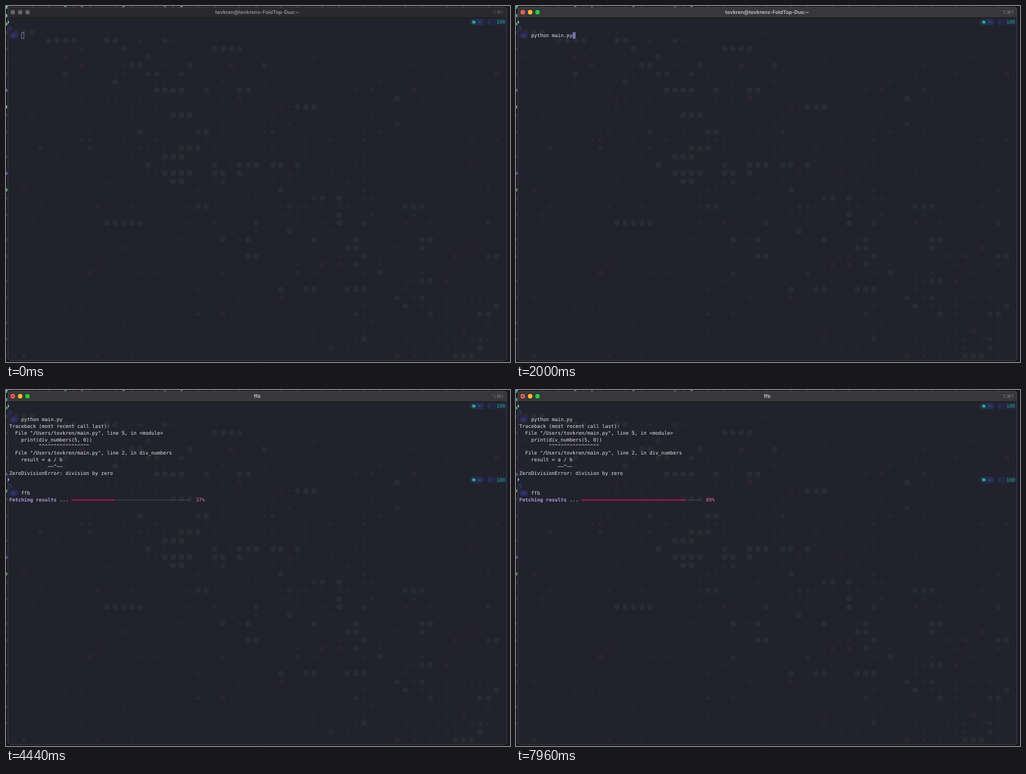
Write an HTML page with a canvas that moves like this. It is 891x629 px and loops after 8 s.

```html
<!DOCTYPE html>
<html lang="en">
<head>
<meta charset="utf-8">
<title>Terminal</title>
<style>
html, body { margin: 0; width: 100%; height: 100%; overflow: hidden; background: #18181f; }
canvas { display: block; }
</style>
</head>
<body>
<canvas id="stage" width="891" height="629"></canvas>
<script>
const ctx = document.getElementById('stage').getContext('2d');
const LOOP = 8000, COL = 5.238, ROW = 11.83, LEFT = 5.8, TOP = 28.4, PITCH = 14.66;
const USER = 'tovkren', HOME_TITLE = `${USER}@${USER}s-FoldTop-Duo:~`;
const MONO = '8.7px "DejaVu Sans Mono", monospace';
const TITLE_FONT = 'bold 8.8px Inter, sans-serif';
const KEYS_FONT = '8.4px Inter, "DejaVu Sans", sans-serif';
const WHITE = '#e6e6ea', NAVY = '#282c58', GREEN = '#57b857', PURPLE = '#6c63b8', TEAL = '#58c4b4', GREY = '#33333e';

const TRACEBACK = [
  'Traceback (most recent call last):',
  `  File "/Users/${USER}/main.py", line 5, in <module>`,
  '    print(div_numbers(5, 0))',
  '          ^^^^^^^^^^^^^^^^^',
  `  File "/Users/${USER}/main.py", line 2, in div_numbers`,
  '    result = a / b',
  '             ~~^~~',
  'ZeroDivisionError: division by zero'
];

// Times spread evenly, rounded to the 40 ms screen refresh.
const evenly = (from, to, count) =>
  Array.from({ length: count }, (_, i) => Math.round((from + (to - from) * i / (count - 1)) / 40) * 40);

const PYTHON_KEYS = [...evenly(680, 1280, 8), ...evenly(1440, 1720, 4), 1920, 2000];
const FFB_KEYS = [2560, 2680, 2840];
const typed = (text, keys, t) => text.slice(0, keys.filter(k => k <= t).length);

// The bar runs between a few key points and is redrawn only at the ticks.
const PERCENT = [[3080, 0], [3560, 13], [4440, 37], [5360, 60], [6200, 83], [6400, 84.3], [7960, 88.65]];
const TICKS = [...evenly(3080, 4440, 15), ...evenly(4560, 5360, 9), ...evenly(5440, 6200, 9),
  6400, 6600, 6720, 6920, 7120, 7200, 7560, 7960];

function percentAt(t) {
  const tick = TICKS.filter(k => k <= t).pop();
  const i = Math.max(1, PERCENT.findIndex(p => p[0] >= tick));
  const [t0, p0] = PERCENT[i - 1], [t1, p1] = PERCENT[i];
  return p0 + (p1 - p0) * (tick - t0) / (t1 - t0);
}

function rect(x, y, w, h, color, radius = 0) {
  ctx.fillStyle = color;
  ctx.beginPath();
  ctx.roundRect(x, y, w, h, radius);
  ctx.fill();
}

function disc(x, y, r, color) {
  ctx.fillStyle = color;
  ctx.beginPath();
  ctx.arc(x, y, r, 0, 7);
  ctx.fill();
}

function label(str, x, y, color, font, align = 'left') {
  ctx.font = font;
  ctx.textAlign = align;
  ctx.fillStyle = color;
  ctx.fillText(str, x, y);
}

const rowY = row => TOP + ROW * row;
const print = (str, col, row, color = WHITE, weight = '') =>
  label(str, LEFT + col * COL, rowY(row) + 3, color, weight + MONO);
const mix = (a, b, k) => `rgb(${a.map((v, i) => Math.round(v + (b[i] - v) * k))})`;
const at = k => 2.4 + PITCH * k;

// Faint dots on a grid, densest along the diagonal; green ones tend to join in runs.
function wallpaper() {
  let seed = 7;
  const random = () => (seed = seed * 16807 % 2147483647) / 2147483647;
  for (let row = 3; row < 43; row++) {
    let inRun = false;
    for (let col = 1; col < 60; col++) {
      const off = (col - row * 1.3 - 4) / 13;
      const near = Math.exp(-off * off);
      const chance = random(), size = random(), tint = random();
      inRun = inRun ? chance < 0.45 : chance < 0.07 * near;
      if (inRun) disc(at(col), at(row), 5, '#282c30');
      else if (chance < 0.1 + 0.34 * near)
        disc(at(col), at(row), 2.4 + size * 2.8, tint < 0.8 ? '#242530' : tint < 0.93 ? '#2c242d' : '#242b31');
    }
  }
}

// Edges of the desktop pattern left visible above and beside the window.
function desktop(focus) {
  rect(0, 0, 891, 629, '#18181f');
  ctx.globalAlpha = 1 - 0.2 * focus;
  for (let k = 0; k < 60; k++) {
    const lit = k < 25, dim = k * 7 % 5 < 2 ? GREY : '#1c1c24';
    const top = lit && k % 10 === 9 ? PURPLE : lit && k % 7 === 0 ? GREEN : dim;
    const side = k < 2 ? TEAL : lit && k % 10 === 0 ? PURPLE : lit && k % 10 === 2 ? GREEN : dim;
    rect(at(k) - 2, 0, 4, 1.8, top);
    rect(0, at(k) - 2.5, 2.4, 5, side);
  }
  ctx.globalAlpha = 1;
}

function windowFrame(focus, title, busy) {
  ctx.save();
  ctx.beginPath();
  ctx.roundRect(3, 2, 883, 624.5, 5);
  ctx.clip();
  rect(3, 2, 883, 625, '#21222b');
  wallpaper();
  rect(3, 2, 883, 18.5, mix([42, 42, 44], [56, 56, 58], focus));
  rect(3, 20, 883, 0.8, '#17171c');
  ctx.restore();
  ctx.strokeStyle = '#4a4a54';
  ctx.lineWidth = 0.9;
  ctx.beginPath();
  ctx.roundRect(3.3, 2.3, 882.3, 624, 5);
  ctx.stroke();

  [[255, 95, 87], [254, 188, 46], [40, 200, 64]].forEach((color, i) =>
    disc(12 + 13 * i, 11, 3.95, mix([101, 101, 104], color, focus)));
  if (busy) disc(12, 11, 1.3, '#7c1712');
  label(title, 444, 14, mix([138, 138, 140], [184, 184, 187], focus), TITLE_FONT, 'center');
  label('⌥⌘1', 879, 13.5, mix([100, 100, 103], [125, 125, 128], focus), KEYS_FONT, 'right');
}

function prompt(row) {
  const y = rowY(row);
  ctx.fillStyle = '#7cb4ea';
  ctx.beginPath();
  ctx.moveTo(3, y - 3.5);
  ctx.lineTo(6, y);
  ctx.lineTo(3, y + 3.5);
  ctx.fill();
  rect(5.6, y + ROW - 5.5, 5.2, 11, NAVY, [0, 5, 5, 0]);
  rect(5.8, y + 2 * ROW - 5.6, 15.5, 11.2, NAVY, 5.6);
  print('~', 1, row + 2, '#a06c9c');

  rect(819.6, y - 5.6, 26, 11.2, NAVY, 5.6);
  rect(824.5, y - 2.5, 3, 2, '#18c653');
  rect(824.5, y - 1.8, 5.3, 4.2, '#18c653', 0.5);
  label('~', 835, y + 3, '#30a8a4', MONO);
  rect(851, y - 5.6, 34, 11.2, '#232741', [5.6, 0, 0, 5.6]);
  rect(851, y - 5.6, 5.5, 11.2, NAVY, [5.5, 0, 0, 5.5]);
  label('100', 882.6, y + 3, '#27a878', MONO, 'right');
}

function cursor(col, row, filled = true) {
  const x = LEFT + col * COL, y = rowY(row) - 5.7;
  if (filled) return rect(x, y, COL, 11.5, '#7870b0');
  ctx.strokeStyle = '#8882b4';
  ctx.lineWidth = 0.9;
  ctx.strokeRect(x + 0.5, y + 0.4, COL - 0.8, 10.7);
}

// Forty cells wide, advancing by half cells, with a half-cell gap after the filled part.
function progress(t) {
  const percent = percentAt(t), halves = Math.floor(percent * 0.8);
  const start = LEFT + 21 * COL + 0.3, y = rowY(14) + 0.4;
  const rest = halves ? (halves + 1) * COL / 2 + 0.6 : 0;
  print('Fetching results ...', 0, 14, '#ad9ce4', 'bold ');
  rect(start + rest, y - 0.6, 40 * COL - rest + 0.8, 1.2, '#43444a');
  if (halves) rect(start, y - 0.9, halves * COL / 2 + 0.8, 1.8, '#cc1267');
  print(`${percent.toFixed(0)}%`.padStart(4), 62, 14, '#d778b0');
}

function draw(t) {
  const focus = t < 40 ? 0 : Math.min(1, (Math.floor((t - 40) / 66.6) + 1) / 4);
  const running = t >= 2240 && t < 2360 || t >= 2960;
  const title = !running ? HOME_TITLE : t < 2360 ? 'python' : 'ffb';
  ctx.textRendering = 'geometricPrecision';
  desktop(focus);
  windowFrame(focus, title, running);

  prompt(0);
  const command = typed('python main.py', PYTHON_KEYS, t);
  print(command, 4, 2);
  if (t < 2240) return cursor(4 + command.length, 2, t >= 40);
  if (t < 2320) return cursor(0, 3);

  TRACEBACK.forEach((line, i) => print(line, 0, 3 + i));
  if (t < 2360) return cursor(0, 11);

  prompt(11);
  const second = typed('ffb', FFB_KEYS, t);
  print(second, 4, 13);
  if (t < 2920) cursor(4 + second.length, 13);
  else if (t < 3040) cursor(0, 14);
  else if (t >= 3080) progress(t);
}

function frame() {
  draw(performance.now() % LOOP);
  requestAnimationFrame(frame);
}
frame();
</script>
</body>
</html>
```
